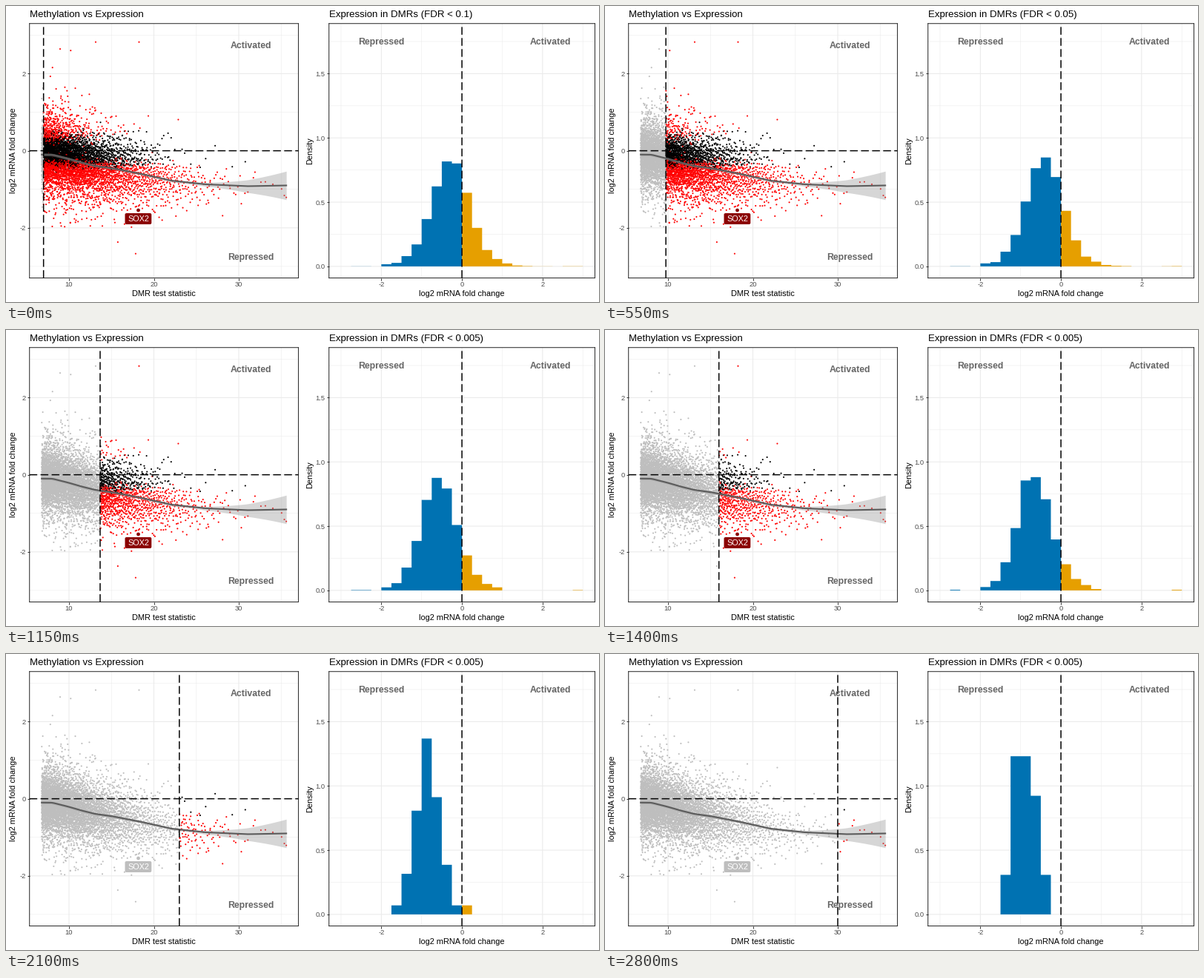
Animation of 800 by 400 pixels, one loop 2850 ms. Source, as a matplotlib script:

```python
import matplotlib.pyplot as plt
import numpy as np
from matplotlib.animation import FuncAnimation
from matplotlib.patches import Circle, FancyBboxPatch

W, H = 800, 400
PX = 0.72  # points per pixel at 100 dpi
GREY, RED, BLACK = (0.745,) * 3, (1, 0, 0), (0, 0, 0)
DARK_RED, INK = "#8B0000", "#333333"
BLUE, ORANGE = "#0072B2", "#E69F00"

plt.rcParams.update({"font.family": "Liberation Sans", "axes.unicode_minus": False,
                     "path.snap": False})
rng = np.random.default_rng(12)

# ---------- data ----------
X_MIN, X_MAX, COUNT, BLOCK = 6.785, 35.6, 5950, 14
STRAYS = [(13.14, 2.82), (18.25, 2.82), (8.95, 2.64), (10.2, 2.6),
          (17.85, -2.67), (15.75, -2.37)]

# Smoothed trend through a few key points
fit_x = np.linspace(X_MIN, X_MAX, 600)
trend = np.interp(fit_x, [6.8, 8, 10, 11.2, 13, 15, 18.5, 22, 26, 31, 35.6],
                  [-.1, -.1, -.21, -.29, -.39, -.45, -.6, -.775, -.87, -.92, -.9])
kernel = np.hanning(23) / np.hanning(23).sum()
fit_y = np.convolve(np.pad(trend, 11, mode="edge"), kernel, "valid")


def make_points():
    # Survival exp(-0.195 t - 0.003 t^2), taken from the largest x down
    e = -np.log((np.arange(COUNT) + rng.random(COUNT)) / COUNT)
    t = (np.sqrt(0.195 ** 2 + 4 * 0.003 * e) - 0.195) / (2 * 0.003)
    x = np.minimum(X_MIN + t, X_MAX)
    # Logistic spread around the trend, evenly stratified block by block
    ranks = np.concatenate([rng.permutation(BLOCK) for _ in range(COUNT // BLOCK + 1)])
    u = (ranks[:COUNT] + rng.uniform(0.001, 0.999, COUNT)) / BLOCK
    scale = np.clip(0.27 - 0.016 * (x - 19), 0.17, 0.26)
    y = np.interp(x, fit_x, fit_y) + scale * np.log(u / (1 - u))
    y = np.where(y < -2, -4 - y, y)
    x, y = np.vstack([np.column_stack([x, y]), STRAYS]).T
    # Chance of a significant expression change grows with |y|
    up = y > 0
    mid = np.where(up, 0.31 + 0.018 * (x - 7), 0.3 + 0.004 * (x - 7))
    odds = np.exp(-np.clip((np.abs(y) - mid) / 0.06, -50, 50))
    red = rng.random(len(x)) < 1 / (1 + odds)
    order = rng.permutation(len(x))
    return x[order], y[order], red[order]


x, y, red = make_points()
live = np.where(red[:, None], RED, BLACK)

# One cutoff per frame, in three step sizes
steps = np.concatenate([np.arange(7, 9.9, 0.25), np.linspace(10, 15, 16),
                        np.arange(16, 30.1, 0.5)])


def fdr(cut):
    for limit, label in ((8.4, "0.1"), (10.9, "0.05"), (12.9, "0.01")):
        if cut < limit:
            return label
    return "0.005"


# ---------- layout ----------
fig = plt.figure(figsize=(W / 100, H / 100), dpi=100, facecolor="white")
TOP, BOTTOM = 23.7, 367.5


def panel(left, right, xlim, ylim, xticks, yticks, xminor, yminor, fmt):
    ax = fig.add_axes([left / W, 1 - BOTTOM / H, (right - left) / W, (BOTTOM - TOP) / H])
    ax.set(xlim=xlim, ylim=ylim, xticks=xticks, yticks=yticks)
    ax.set_xticks(xminor, minor=True)
    ax.set_yticks(yminor, minor=True)
    ax.set_yticklabels([fmt % t for t in yticks])
    ax.set_axisbelow(True)
    ax.grid(which="major", color="#EBEBEB", lw=1.07 * PX)
    ax.grid(which="minor", color="#EBEBEB", lw=0.53 * PX)
    ax.tick_params(which="major", length=2.75 * PX, width=1.07 * PX, pad=2.2 * PX,
                   color=INK, labelcolor="#4D4D4D", labelsize=9.4 * PX)
    ax.tick_params(which="minor", length=0)
    for spine in ax.spines.values():
        spine.set(color=INK, lw=1.07 * PX)
    return ax


left = panel(31.7, 394.5, (5.345, 37.03), (-3.3, 3.3), [10, 20, 30], [-2, 0, 2],
             [15, 25, 35], [-3, -1, 1, 3], "%d")
right = panel(435.7, 794.5, (-3.3, 3.3), (-0.09, 1.89), [-2, 0, 2], np.arange(0, 2, 0.5),
              [-3, -1, 1, 3], np.arange(0.25, 2, 0.5), "%.1f")

# Overlay in pixel units for text and the label
page = fig.add_axes([0, 0, 1, 1])
page.set(xlim=(0, W), ylim=(H, 0))
page.axis("off")


def write(px, py, s, size, **kw):
    opts = {"ha": "center", "va": "baseline", "color": "black", **kw}
    return page.text(px, py, s, fontsize=size * PX, **opts)


write(31.7, 15, "Methylation vs Expression", 13.2, ha="left")
title = write(435.7, 15, "", 13.2, ha="left")
write(213, 391.8, "DMR test statistic", 11)
write(615, 391.8, "log2 mRNA fold change", 11)
write(10.5, 195.6, "log2 mRNA fold change", 11, rotation=90, va="center")
write(410, 195.6, "Density", 11, rotation=90, va="center")
for px, py, word in ((330.5, 57, "Activated"), (330.5, 343, "Repressed"),
                     (506.5, 52, "Repressed"), (734.5, 52, "Activated")):
    write(px, py, word, 12.3, weight="bold", color="#666666")

# ---------- scatter panel ----------
dots = left.scatter(x, y, s=(2.1 * PX) ** 2, c=live, linewidths=0, zorder=2)

band = 0.035 + 0.335 * (np.clip(fit_x - 23.5, 0, None) / 12.1) ** 2
left.fill_between(fit_x, fit_y - band, fit_y + band, color="#999999", alpha=0.4, lw=0, zorder=3)
left.plot(fit_x, fit_y, color="#5C5C5C", lw=2.1 * PX, zorder=4)

dash = {"color": "black", "lw": 1.494 * PX, "ls": (0, (7, 3))}
left.axhline(0, zorder=5, **dash)
cut_line = left.axvline(7, zorder=6, **dash)

marker = page.add_patch(Circle((178.5, 276), 2.4, lw=0))
tag = page.add_patch(FancyBboxPatch((162.5, 282), 31.8, 11, lw=0,
                                    boxstyle="round,pad=2,rounding_size=2"))
write(178.6, 291.4, "SOX2", 10.9, color="white")

# ---------- histogram panel ----------
EDGES = np.arange(-3, 3.01, 0.25)
bars_down = right.stairs(np.zeros(12), EDGES[:13], fill=True, color=BLUE, lw=0, zorder=2)
bars_up = right.stairs(np.zeros(12), EDGES[12:], fill=True, color=ORANGE, lw=0, zorder=2)
right.axvline(0, zorder=5, **dash)


def draw(i):
    cut = steps[i]
    active = x >= cut
    dots.set_facecolor(np.where(active[:, None], live, GREY))
    cut_line.set_xdata([cut, cut])
    tone = DARK_RED if cut < 18.15 else GREY
    marker.set_facecolor(tone)
    tag.set_facecolor(tone)
    heights = np.histogram(y[active], EDGES, density=True)[0]
    bars_down.set_data(heights[:12])
    bars_up.set_data(heights[12:])
    title.set_text(f"Expression in DMRs (FDR < {fdr(cut)})")
    return dots, cut_line, marker, tag, bars_down, bars_up, title


anim = FuncAnimation(fig, draw, frames=len(steps), interval=50, repeat=True, repeat_delay=0)
plt.show()
```
